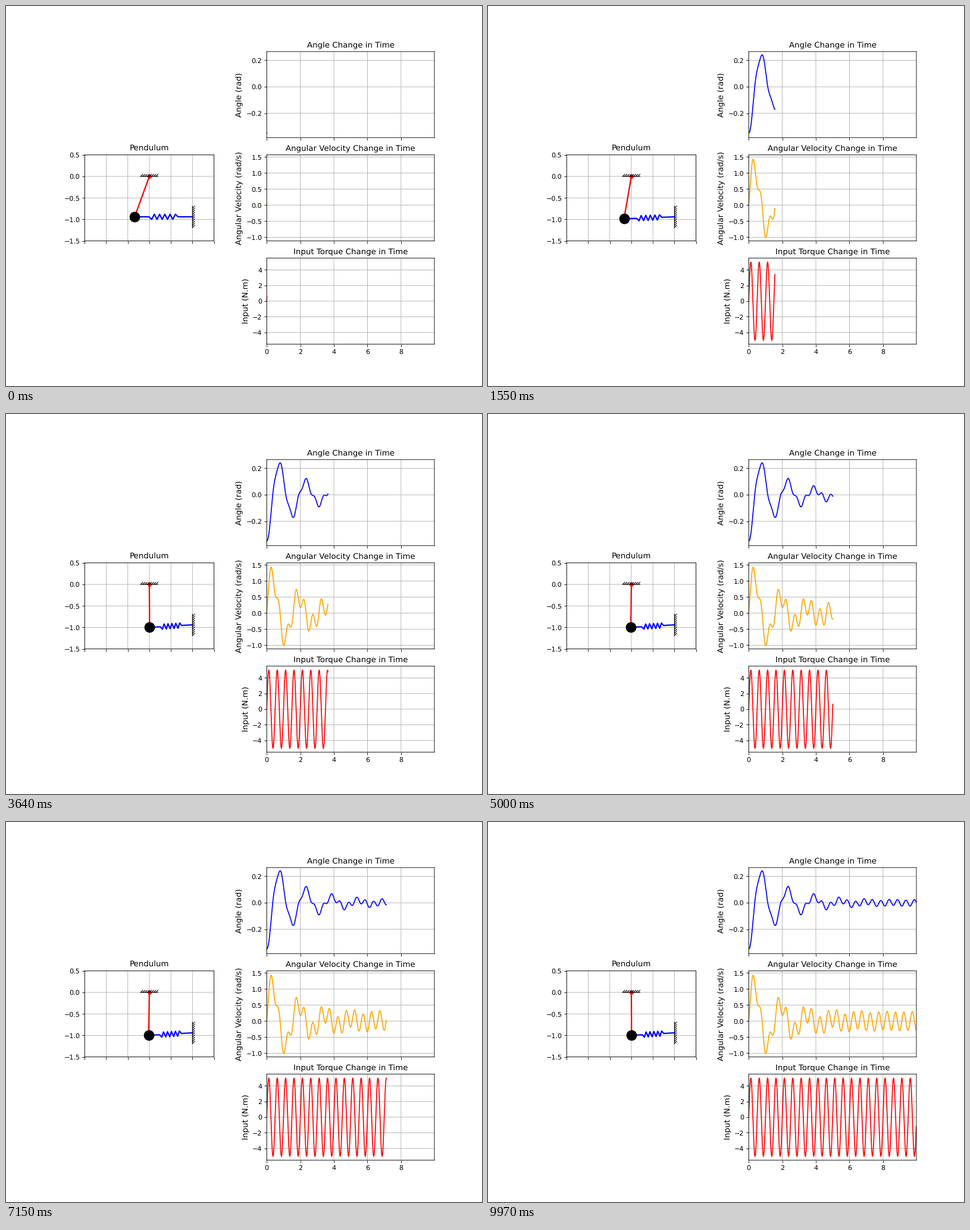
Recreate the animation shown at these times as a matplotlib script. Size 800x640 px, loop 10000 ms.

```python
import numpy as np
import matplotlib.pyplot as plt
from matplotlib.animation import FuncAnimation

FPS = 33
FRAMES = 330
DT = 0.01
START = np.radians(-20)

# Pendulum with a side spring, damping and a sinusoidal torque
MASS, GRAVITY, SPRING, DAMPING = 1.53, 9.81, 10.2, 1.59
TORQUE, FREQ = 5.0, 2.0


def torque(t):
    return TORQUE * np.sin(2 * np.pi * FREQ * t)


def slope(t, state):
    angle, speed = state
    pull = SPRING * np.sin(angle) * np.cos(angle)
    accel = (torque(t) - DAMPING * speed - pull) / MASS - GRAVITY * np.sin(angle)
    return np.array([speed, accel])


def simulate(times):
    states = [np.array([START, 0.0])]
    for t in times[:-1]:
        s = states[-1]
        k1 = slope(t, s)
        k2 = slope(t + DT / 2, s + DT / 2 * k1)
        k3 = slope(t + DT / 2, s + DT / 2 * k2)
        k4 = slope(t + DT, s + DT * k3)
        states.append(s + DT / 6 * (k1 + 2 * k2 + 2 * k3 + k4))
    return np.array(states).T


times = np.arange(1000) * DT
angles, speeds = simulate(times)
inputs = torque(times)

# Soft subpixel placement of lines and glyphs
plt.rcParams["path.snap"] = False
plt.rcParams["text.hinting"] = "none"

fig = plt.figure(figsize=(10, 8), dpi=80)
grid = fig.add_gridspec(3, 2)


def time_plot(row, title, label, color, limits, ticks):
    ax = fig.add_subplot(grid[row, 1])
    ax.set_title(title, fontsize=12)
    ax.set_ylabel(label, fontsize=12)
    ax.set_xlim(0, times[-1])
    ax.set_ylim(*limits)
    ax.set_xticks(range(0, 10, 2))
    ax.set_yticks(ticks)
    ax.tick_params(labelbottom=row == 2)
    ax.grid(True)
    return ax.plot([], [], color=color, lw=1.5)[0]


angle_line = time_plot(0, "Angle Change in Time", "Angle (rad)", "blue",
                       (-0.384, 0.2658), [-0.2, 0.0, 0.2])
speed_line = time_plot(1, "Angular Velocity Change in Time",
                       "Angular Velocity (rad/s)", "orange",
                       (-1.115, 1.565), np.arange(-1, 1.6, 0.5))
input_line = time_plot(2, "Input Torque Change in Time", "Input (N.m)", "red",
                       (-5.5, 5.5), [-4, -2, 0, 2, 4])
curves = [(angle_line, angles), (speed_line, speeds), (input_line, inputs)]

scene = fig.add_subplot(grid[1, 0])
scene.set_title("Pendulum", fontsize=12)
scene.set_aspect("equal", adjustable="box")
scene.set_xlim(-1.5, 1.5)
scene.set_ylim(-1.5, 0.5)
scene.set_xticks(np.arange(-1.5, 1.6, 0.5))
scene.set_yticks(np.arange(-1.5, 0.6, 0.5))
scene.tick_params(labelbottom=False)
scene.grid(True)

WALL = np.array([1.0, -np.cos(START)])
HATCH = 0.05


def draw_support(start, end, strokes):
    scene.plot(*zip(start, end), color="black", lw=1, zorder=2.4)
    for i in range(strokes):
        x, y = np.add(start, np.subtract(end, start) * i / strokes)
        scene.plot([x, x + HATCH], [y, y + HATCH], color="black", lw=1, zorder=2.4)


draw_support((-0.2, 0), (0.2, 0), 8)
draw_support(WALL - (0, 0.25), WALL + (0, 0.25), 10)

spring_line, = scene.plot([], [], color="blue", lw=2)
rod_line, = scene.plot([], [], color="red", lw=2)
scene.plot(0, 0, "o", color="red", ms=5)
bob, = scene.plot([], [], "o", color="black", ms=15)


def spring_points(start, end, bends=10, height=0.06):
    along = np.concatenate([[0], np.linspace(0.25, 0.75, bends + 2), [1]])
    side = np.zeros(bends + 4)
    side[2:-2] = -height * (-1.0) ** np.arange(bends)
    axis = end - start
    normal = np.array([-axis[1], axis[0]]) / np.hypot(*axis)
    return (start + np.outer(along, axis) + np.outer(side, normal)).T


def update(frame):
    last = int(round(frame / FPS / DT)) + 1
    for line, values in curves:
        line.set_data(times[:last + 1], values[:last + 1])
    tip = np.array([np.sin(angles[last]), -np.cos(angles[last])])
    rod_line.set_data([0, tip[0]], [0, tip[1]])
    bob.set_data([tip[0]], [tip[1]])
    spring_line.set_data(*spring_points(tip, WALL))
    return angle_line, speed_line, input_line, spring_line, rod_line, bob


anim = FuncAnimation(fig, update, frames=FRAMES, interval=1000 / FPS,
                     repeat=True, repeat_delay=0)
plt.show()
```
